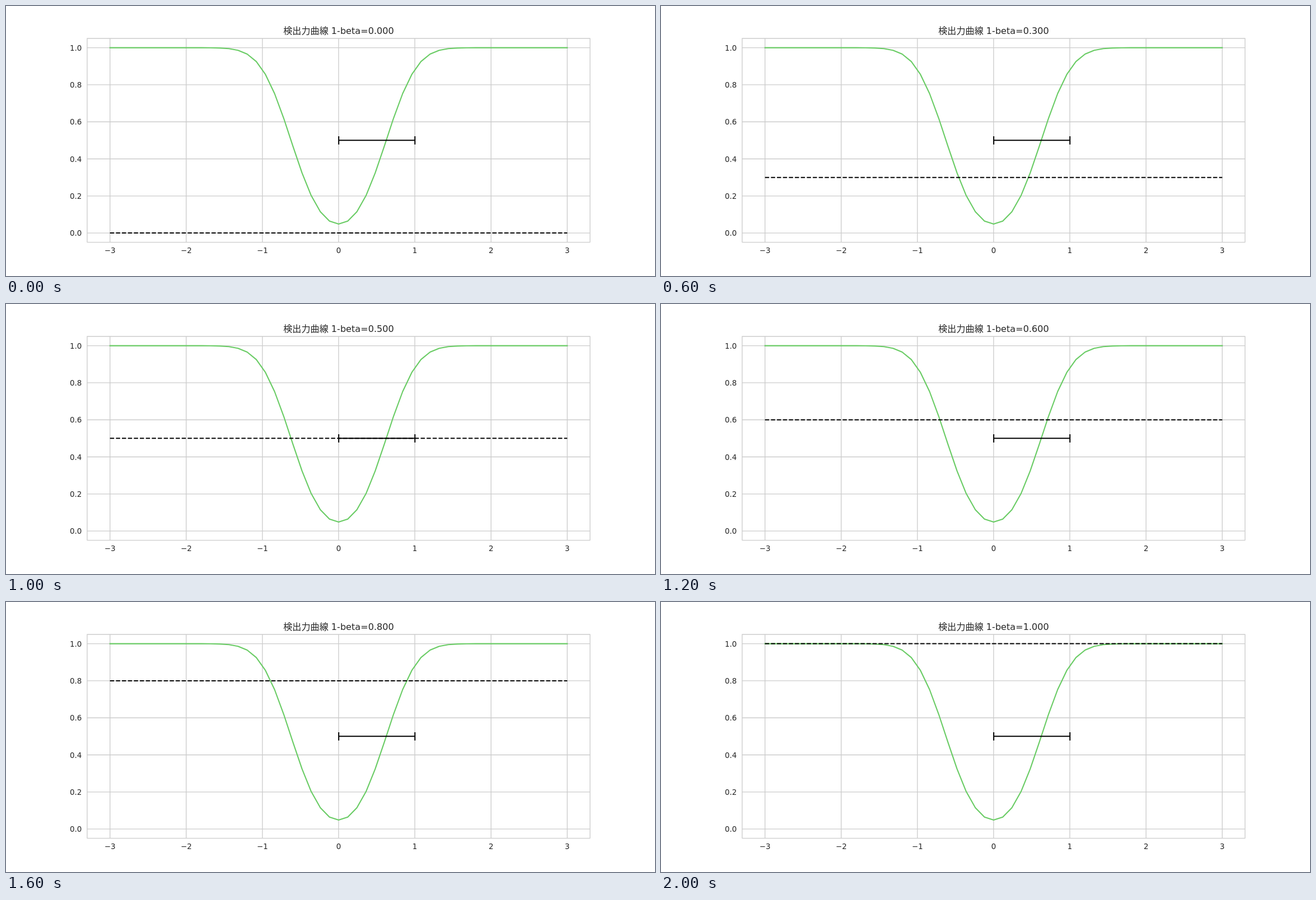
An HTML page with a canvas that plays this animation: 1159 by 483 pixels, repeating every 2.2 s.

```html
<!DOCTYPE html>
<html lang="ja">
<head>
<meta charset="utf-8">
<title>検出力曲線</title>
<style>
html, body { margin: 0; width: 100%; height: 100%; overflow: hidden; background: #fff; }
canvas { display: block; }
</style>
</head>
<body>
<canvas id="stage" width="1159" height="483"></canvas>
<script>
const ctx = document.getElementById('stage').getContext('2d');
const W = 1159, H = 483;
const STEP = 200, STEPS = 11;
const box = { l: 144.9, r: 1043, t: 58, b: 422.6 };
const FONT = '"DejaVu Sans", "Noto Sans CJK JP", "Noto Sans CJK", sans-serif';
const INK = '#262626', GRID = '#cccccc';

const px = x => 594 + 136.1 * x;
const py = y => 406.1 - 331.5 * y;

// Normal distribution function (Abramowitz-Stegun 7.1.26)
function phi(z) {
  const u = Math.abs(z) / Math.SQRT2;
  const t = 1 / (1 + 0.3275911 * u);
  const poly = t * (0.254829592 + t * (-0.284496736 + t * (1.421413741 + t * (-1.453152027 + t * 1.061405429))));
  const erf = 1 - poly * Math.exp(-u * u);
  return z < 0 ? (1 - erf) / 2 : (1 + erf) / 2;
}

// Power of a two-sided test with ten samples
function power(d) {
  const shift = Math.sqrt(10) * d, crit = 1.975;
  return phi(shift - crit) + phi(-shift - crit);
}

function path(points, color, width, dash = [], cap = 'butt') {
  ctx.beginPath();
  points.forEach(([x, y]) => ctx.lineTo(x, y));
  ctx.strokeStyle = color;
  ctx.lineWidth = width;
  ctx.lineCap = cap;
  ctx.lineJoin = 'round';
  ctx.setLineDash(dash);
  ctx.stroke();
}

function label(text, x, y, size, align) {
  ctx.font = `${size}px ${FONT}`;
  ctx.fillStyle = INK;
  ctx.textAlign = align;
  ctx.textBaseline = 'alphabetic';
  ctx.fillText(text, x, y);
}

function drawAxes() {
  for (let i = -3; i <= 3; i++) {
    path([[px(i), box.t], [px(i), box.b]], GRID, 1.35);
    label(String(i).replace('-', '\u2212'), px(i), 441.8, 13.4, 'center');
  }
  for (let i = 0; i <= 5; i++) {
    const y = py(i / 5);
    path([[box.l, y], [box.r, y]], GRID, 1.35);
    label((i / 5).toFixed(1), 135.2, y + 5, 13.4, 'right');
  }
}

function drawFrame() {
  ctx.setLineDash([]);
  ctx.strokeStyle = GRID;
  ctx.lineWidth = 1.35;
  ctx.strokeRect(box.l, box.t, box.r - box.l, box.b - box.t);
}

function drawCurve() {
  const points = Array.from({ length: 51 }, (_, i) => {
    const x = -3 + 0.12 * i;
    return [px(x), py(power(x))];
  });
  path(points, '#6acc65', 2.1, [], 'square');
}

function drawSpan() {
  const y = py(0.5), a = px(0) + 0.2, b = px(1) + 0.2;
  path([[a, y], [b, y]], '#000', 2);
  for (const x of [a, b]) path([[x, y - 7.4], [x, y + 7.4]], '#000', 2);
}

function draw(now) {
  const level = Math.floor(now / STEP) % STEPS / 10;
  ctx.fillStyle = '#fff';
  ctx.fillRect(0, 0, W, H);
  drawAxes();
  drawCurve();
  path([[px(-3), py(level)], [px(3), py(level)]], '#000', 2, [7.45, 3.22]);
  drawFrame();
  drawSpan();
  label(`検出力曲線 1-beta=${level.toFixed(3)}`, 594, 49.8, 16.1, 'center');
}

const start = performance.now();
function tick() {
  draw(performance.now() - start);
  requestAnimationFrame(tick);
}
tick();
</script>
</body>
</html>
```
